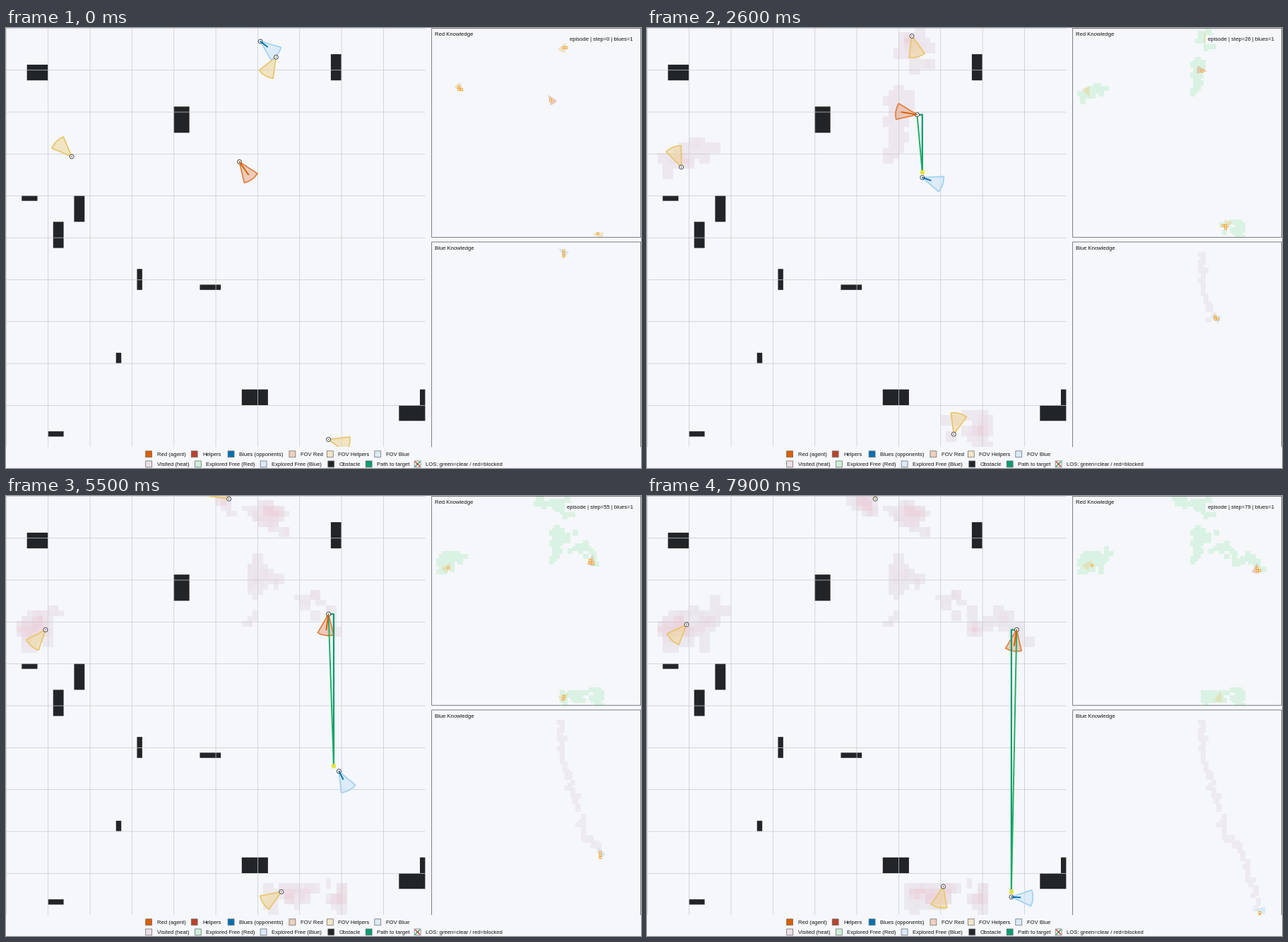
Animation, 899 px wide and 623 px high, one loop 8000 ms. Source, as a matplotlib script:

```python
import numpy as np
import matplotlib.pyplot as plt
from matplotlib.animation import FuncAnimation
from matplotlib.patches import Circle, Polygon, Rectangle

PX_W, PX_H, DPI = 899, 623, 64
W, H = 1212, 840                 # scene units: one map cell is 10 units
U = 72 / DPI * PX_W / W          # one scene unit in points
STEPS, N = 80, 80
SIGHT_STEP, DECAY_STEP = 12, 50
HALF_FOV, REACH = 22, 41

BG, INK, ORANGE = "#f5f7fa", "#222528", "#f09a20"
RED, BLUE, PATH, LOS = "#d95f02", "#0571b0", "#0a9c6f", "#1bb060"

plt.rcParams.update({"font.family": "Liberation Sans", "path.snap": False,
                     "lines.solid_capstyle": "butt"})
fig = plt.figure(figsize=(PX_W / DPI, PX_H / DPI), dpi=DPI, facecolor=BG)
ax = fig.add_axes([0, 0, 1, 1])

# Key poses of each walker: column, row, heading in degrees (clockwise).
KEYS = (0, 17, 35, 46, 55, 69, 79)
WALKS = {
    "north": [(51, 5, 120), (52, 0, 120), (49, 2, 31), (43, 0, 164),
              (42, 0, 210), (43, 0, 120), (43, 0, 270)],
    "west": [(12, 24, 225), (6, 27, 270), (6, 25, 225), (6, 27, 180),
             (7, 25, 131), (11, 22, -43), (7, 24, 133)],
    "south": [(61, 78, 15), (61, 76, -30), (55, 78, 239), (53, 78, 285),
              (52, 75, 147), (54, 74, 105), (56, 74, 102)],
    "blue": [(48, 2, 38), (49, 19, 24), (55, 37, 14), (57, 47, 28),
             (63, 52, 62), (68, 66, 59), (69, 76, 3)],
    "red": [(44, 25, 55), (47, 15, 236), (55, 17, 143), (57, 20, -35),
            (61, 22, 98), (66, 24, -36), (70, 25, 99)],
}
RED_TEAM = ("north", "west", "south", "red")

# Column, row, width, height.
OBSTACLES = [
    (4, 7, 4, 3), (62, 5, 2, 5), (32, 15, 3, 5), (3, 32, 3, 1), (13, 32, 2, 5),
    (9, 37, 2, 5), (25, 46, 1, 4), (37, 49, 4, 1), (21, 62, 1, 2), (45, 69, 5, 3),
    (79, 69, 1, 3), (75, 72, 5, 3), (8, 77, 3, 1),
]

# Cone fill, cone edge, fill and alpha on the small map.
STYLE = {
    "red": ("#e9a987", "#e07b3c", "#e2a27d", .5),
    "blue": ("#cbe4f7", "#a0d1f2", "#cfe6f8", .8),
    "helper": ("#efd596", "#e9c466", "#e8cf8a", .45),
}


def direction(degrees):
    a = np.radians(degrees)
    return np.stack([np.cos(a), np.sin(a)], axis=-1)


def pose(name, t):
    x, y, a = np.array(WALKS[name], float).T
    cell = np.rint([np.interp(t, KEYS, x), np.interp(t, KEYS, y)]).astype(int)
    return cell, np.interp(t, KEYS, np.unwrap(a, period=360))


def explore(names, near, far, spread, seed):
    """Visit counts per step: each walker marks a 2 x 2 block ahead of it."""
    rng = np.random.default_rng(seed)
    visits = np.zeros((STEPS, N, N), int)
    for t in range(1, STEPS):
        for name in names:
            cell, heading = pose(name, t)
            ahead = direction(heading + rng.normal(0, spread))
            c, r = np.rint(cell + rng.uniform(near, far) * ahead - .5).astype(int)
            visits[t, max(r, 0):max(r + 2, 0), max(c, 0):max(c + 2, 0)] += 1
    return visits.cumsum(axis=0)


team_visits = explore(RED_TEAM, 1, 4, 40, seed=4)
blue_visits = explore(["blue"], 0, 2, 50, seed=7)


class View:
    """A square map of N x N cells."""

    def __init__(self, x, y, size):
        self.x, self.y, self.s = x, y, size
        self.clip = Rectangle((x, y), N * size, N * size, fc="none", ec="none")
        ax.add_patch(self.clip)
        extent = (x, x + N * size, y + N * size, y)
        self.img = ax.imshow(np.zeros((N, N, 4)), extent=extent, aspect="auto",
                             interpolation="nearest", zorder=1)

    def at(self, cell):
        return np.array([self.x, self.y]) + np.asarray(cell) * self.s + self.s // 2 + .5

    def paint(self, mask, rgb):
        img = np.zeros((N, N, 4))
        img[..., :3] = np.asarray(rgb) / 255
        img[..., 3] = mask
        self.img.set_data(img)


world = View(0, 0, 10)
red_map = View(812, 0, 5)
blue_map = View(812, 408, 5)
ax.set_xlim(0, W)
ax.set_ylim(H, 0)
ax.axis("off")


def label(x, y, s, **kw):
    return ax.text(x, y, s, size=10.3 * U, color="#111111",
                   va="center_baseline", zorder=12, **kw)


def line(pts, color, width, z):
    x, y = zip(*pts)
    return ax.plot(x, y, color=color, lw=width * U, zorder=z)[0]


def box(x, y, w, h, **kw):
    return ax.add_patch(Rectangle((x, y), w, h, **kw))


def static_scene():
    for rect in OBSTACLES:
        box(*(10 * v for v in rect), fc=INK, lw=0, zorder=2)
    for p in np.arange(0, 800, 80) + .5:
        line([(p, 0), (p, 800)], "#c8cbcf", 1, 3)
        line([(0, p), (800, p)], "#c8cbcf", 1, 3)
    for view, name in ((red_map, "Red"), (blue_map, "Blue")):
        box(view.x + .5, view.y + .5, 399, 399, fc="none", ec="#55555c", lw=U, zorder=9)
        label(view.x + 6, view.y + 11.5, name + " Knowledge")
    box(0, 800, W, 40, fc=BG, lw=0, zorder=10)


def legend():
    rows = (
        ((266, RED, "Red (agent)"), (353, "#b8432a", "Helpers"),
         (423, BLUE, "Blues (opponents)"), (540, "#efd0bd", "FOV Red"),
         (612, "#f2e6c9", "FOV Helpers"), (703, "#d9eaf6", "FOV Blue")),
        ((266, "#ebdfe7", "Visited (heat)"), (360, "#cdefd9", "Explored Free (Red)"),
         (485, "#dceafa", "Explored Free (Blue)"), (614, INK, "Obstacle"),
         (686, PATH, "Path to target"), (779, "#ffffff", "LOS: green=clear / red=blocked")),
    )
    for y, items in zip((807, 826), rows):
        for x, color, text in items:
            box(x + .5, y + .5, 12, 12, fc=color, ec="#6a6a6e", lw=U, zorder=11)
            label(x + 22, y + 7, text)
    line([(781, 837), (790, 828)], "#1ba35f", 2, 12)
    line([(781, 828), (790, 837)], "#d2382c", 2, 12)


static_scene()
legend()
status = label(1197, 20.5, "", ha="right",
               bbox=dict(fc=BG, lw=0, pad=4 * U))
live = []


def show(artist, view=world):
    artist.set_clip_path(view.clip)
    live.append(artist)


def cone(view, cell, heading, face, alpha, edge=None):
    o = view.at(cell)
    sweep = np.linspace(heading - HALF_FOV, heading + HALF_FOV, 13)
    pts = np.vstack([o, o + REACH * view.s / 10 * direction(sweep)])
    show(ax.add_patch(Polygon(pts, fc=face, alpha=alpha, lw=0, zorder=5)), view)
    if edge:
        show(ax.add_patch(Polygon(pts, fc="none", ec=edge, lw=2.2 * U,
                                  joinstyle="round", zorder=5.1)))


def plan(view, cell, heading, rng, low):
    """A short chain of candidate cells ahead of a walker."""
    spot = np.rint(cell + 2.5 * direction(heading + rng.normal(0, 20)))
    for _ in range(rng.integers(low, 4)):
        x, y = view.at(spot)
        show(box(x - 2, y - 2, 4, 4, fc="#fdf1dc", ec=ORANGE, lw=1.2 * U, zorder=6), view)
        spot[rng.integers(2)] += 1


def agent(name, t):
    kind = name if name in STYLE else "helper"
    face, edge, small, alpha = STYLE[kind]
    mini = blue_map if name == "blue" else red_map
    cell, heading = pose(name, t)
    cone(world, cell, heading, face, .55, edge)
    cone(mini, cell, heading, small, alpha)
    rng = np.random.default_rng([t, list(WALKS).index(name)])
    plan(mini, cell, heading, rng, low=1 if name == "blue" else 0)

    o = world.at(cell)
    show(ax.add_patch(Circle(o, 4, fc="white", ec="#3c3c3c", lw=1.2 * U, zorder=7)))
    show(ax.add_patch(Circle(o, 1.1, fc="#555555", lw=0, zorder=7)))
    if kind != "helper":
        size, color = (31, RED) if name == "red" else (18, BLUE)
        show(line([o, o + size * direction(heading)], color, 2.6, 7.5))


def chase(t):
    hunter = world.at(pose("red", t)[0])
    goal = world.at(pose("blue", t - 1)[0])
    show(line([hunter, (goal[0], hunter[1]), goal], PATH, 3, 6))
    show(line([hunter, goal], LOS, 2.6, 6.1))
    show(box(*(goal - 3.5), 7, 7, fc="#d9e34a", ec="#f1e636", lw=U, zorder=6.2))


def heat(t):
    count = team_visits[t]
    mask = count > 0
    if t >= DECAY_STEP:
        mask = (count > 1) | (count > team_visits[DECAY_STEP])
    cool = np.array([239, 231, 238]) + t / STEPS * np.array([-4, 3, 2])
    warmth = np.clip((count - 2) / 6, 0, 1)[..., None]
    world.paint(mask, cool + warmth * (np.array([236, 212, 222]) - cool))


def draw(t):
    while live:
        live.pop().remove()
    heat(t)
    red_map.paint(team_visits[t] > 0, (218, 242, 227))
    blue_map.paint(blue_visits[t] > 0, (237, 234, 240))
    for name in WALKS:
        agent(name, t)
    if t >= SIGHT_STEP:
        chase(t)
    status.set_text(f"episode | step={t} | blues=1")
    return live


anim = FuncAnimation(fig, draw, frames=STEPS, interval=100, repeat=True,
                     repeat_delay=0, blit=False)
plt.show()
```
